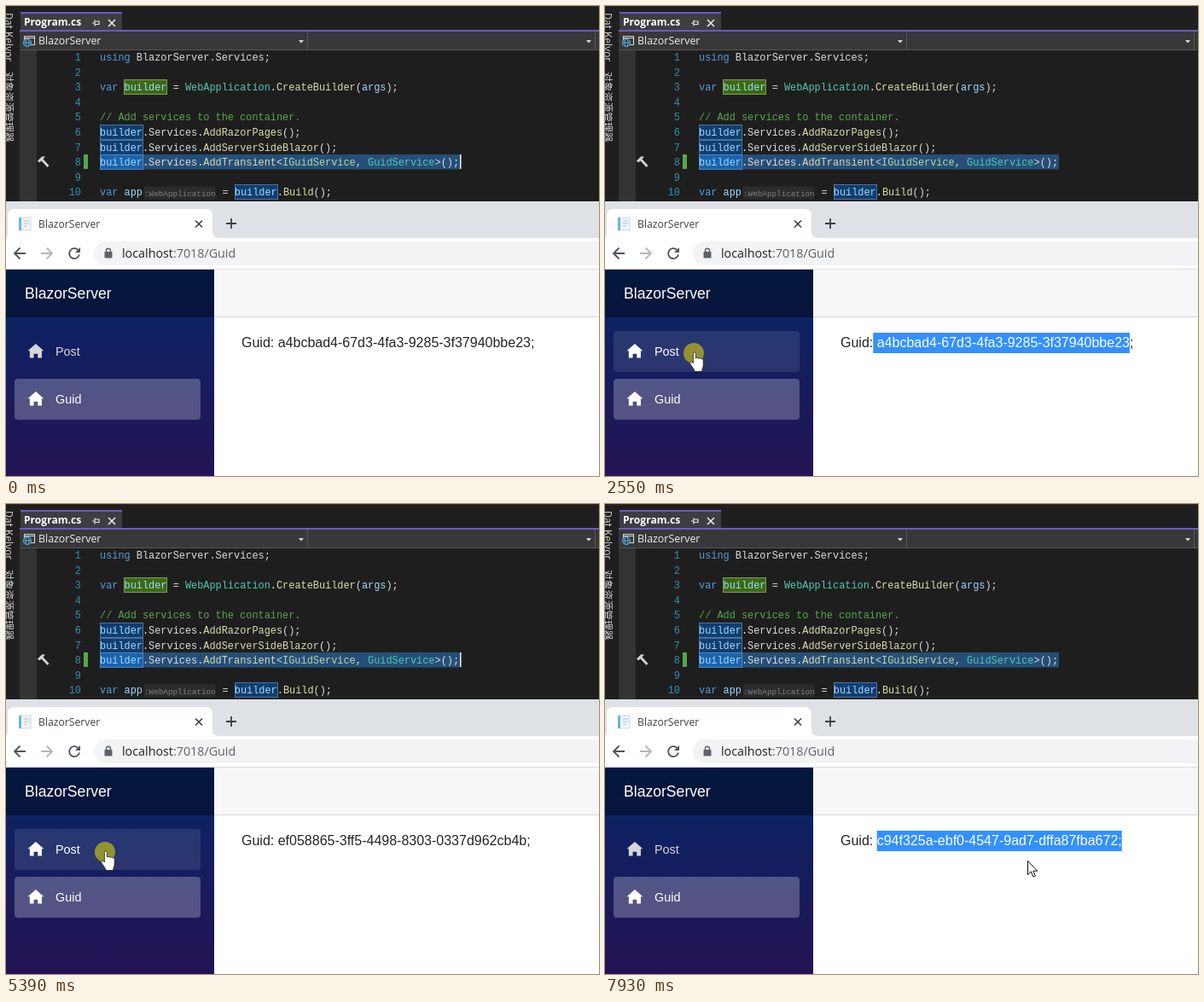
Recreate the animation shown at these times as an HTML page. Size 695 by 551 pixels, loop 8 s.

```html
<!DOCTYPE html>
<html lang="en">
<head>
<meta charset="utf-8">
<title>Transient service demo</title>
<style>
  html, body { margin: 0; width: 100%; height: 100%; overflow: hidden; background: #fff; }
  svg { display: block; }
  text { white-space: pre; }
  .code { font: 11.9px "Liberation Mono", monospace; fill: #dcdcdc; }
  .ui { font-family: "Open Sans", "Noto Sans", sans-serif; }
  .web { font-family: "Liberation Sans", Arial, sans-serif; }
  .side { font: 11.8px "Noto Sans CJK SC", "Noto Sans", sans-serif; fill: #d0d0d0; }
  .num { fill: #2b91af; text-anchor: end; }
  .k { fill: #569cd6; } .v { fill: #9cdcfe; } .t { fill: #4ec9b0; }
  .m { fill: #dcdcaa; } .i { fill: #b8d7a3; } .c { fill: #57a64a; }
  .line { fill: none; stroke-linecap: butt; }
</style>
</head>
<body>
<svg id="stage" width="695" height="551" viewBox="0 0 695 551">
  <defs>
    <linearGradient id="night" gradientUnits="userSpaceOnUse" x1="0" y1="309" x2="0" y2="715">
      <stop offset="0" stop-color="#052767"/><stop offset="1" stop-color="#3a0647"/>
    </linearGradient>
    <path id="home" d="M4 0l-4 3.500h1v3.500h2v-2h2v2h2v-3.500h1z"/>
  </defs>

  <!-- editor -->
  <rect width="695" height="230" fill="#1f1f1f"/>
  <rect width="695" height="1" fill="#35291c"/>
  <rect x="17" y="7" width="119" height="22" fill="#3d3d42"/>
  <rect x="17" y="7" width="119" height="2" fill="#6a5bc4"/>
  <rect x="16" y="28" width="679" height="2" fill="#6a5bc4"/>
  <text x="21" y="23" class="ui" font-size="12.1" font-weight="700" fill="#fff">Program.cs</text>
  <path d="M101 20h3M104 16.500v7M104 18h5v3.500h-5" class="line" stroke="#e8e8e8" stroke-width="1.200"/>
  <path d="M120 16l8 8M128 16l-8 8" class="line" stroke="#f1f1f1" stroke-width="1.500"/>
  <rect x="16" y="30" width="679" height="22" fill="#383838"/>
  <path d="M16 51.500h679M353.500 30v21M690.500 30v21" class="line" stroke="#55555a"/>
  <path d="M343 40h6l-3 3.500zM680 40h6l-3 3.500z" fill="#d6d6d6"/>
  <g class="line" stroke="#58a9dc" stroke-width="1.100">
    <path d="M21.500 35.500h12v10h-12zM21.500 37.500h12" stroke="#d6d6d6"/>
    <circle cx="25" cy="43" r="4.500" fill="#383838"/><ellipse cx="25" cy="43" rx="2" ry="4.500"/><path d="M20.500 43h9"/>
  </g>
  <text x="38" y="45" class="ui" font-size="12.4" fill="#f1f1f1">BlazorServer</text>
  <rect x="16" y="52" width="679" height="178" fill="#1e1e1e"/>
  <rect x="16" y="52" width="20" height="178" fill="#333"/>
  <g transform="rotate(90)"><text x="8" y="1.500" class="side">Dat Kelvor</text><text x="77" y="1.500" class="side">对象资源管理器</text></g>
  <path d="M37 181.500l5-5h4l-2.500 3 7 7.500-2 2-7-7.500-2.500 2z" fill="#d2d2d2"/>
  <rect x="91" y="174" width="5" height="17" fill="#57a64a"/>
  <rect x="110" y="174" width="422" height="17.600" fill="#264f78"/>
  <g id="marks"></g>
  <rect x="161.500" y="211.500" width="84" height="15" rx="2" fill="#2b2b2b"/>
  <g id="code" class="code"></g>
  <rect id="caret" x="532" y="174" width="1.500" height="17" fill="#f0f0f0"/>

  <!-- browser -->
  <rect y="229" width="695" height="322" fill="#fff"/>
  <rect y="229" width="695" height="43" fill="#dee1e6"/>
  <path d="M0 272q2-1 2-6v-20q0-8 8-8h224q8 0 8 8v18q0 8 8 8z" fill="#fff"/>
  <path d="M16 248h13v15h-13z" fill="#eff5f9" stroke="#c3d0da" stroke-width=".8"/>
  <path d="M15 248h3v15h-3z" fill="#6fb3dc"/>
  <path d="M21 252h6M21 255h6M21 258h4" class="line" stroke="#b3c5d2"/>
  <text x="38" y="260" class="ui" font-size="12.2" fill="#3c4043">BlazorServer</text>
  <path d="M222 251.500l8 8M230 251.500l-8 8" class="line" stroke="#3c4043" stroke-width="1.600"/>
  <path d="M258 255h12M264 249v12" class="line" stroke="#3c4043" stroke-width="1.800"/>
  <path d="M23 290h-13M16.500 283.500l-6.500 6.500 6.500 6.500" class="line" stroke="#50545a" stroke-width="1.800"/>
  <path d="M41 290h13M47.500 283.500l6.500 6.500-6.500 6.500" class="line" stroke="#b3b6ba" stroke-width="1.800"/>
  <path d="M84.500 286a6 6 0 1 0 1.500 5.500" class="line" stroke="#50545a" stroke-width="1.800"/>
  <path d="M87 283v6h-6z" fill="#50545a"/>
  <path d="M695 276h-578a14 14 0 0 0 0 28h578z" fill="#f1f3f4"/>
  <rect x="115.500" y="288" width="9" height="7.500" rx="1" fill="#5f6368"/>
  <path d="M117.500 289v-2.200a2.500 2.500 0 0 1 5 0v2.200" class="line" stroke="#5f6368" stroke-width="1.400"/>
  <text x="136" y="295" class="ui" font-size="14.3" fill="#5f6368"><tspan fill="#202124">localhost</tspan>:7018/Guid</text>
  <rect y="308" width="695" height="1" fill="#dcdee1"/>

  <!-- page -->
  <rect y="309" width="244" height="242" fill="url(#night)"/>
  <rect y="309" width="244" height="56" fill="#000" fill-opacity=".4"/>
  <rect x="244" y="309" width="451" height="55" fill="#f7f7f7"/>
  <rect x="244" y="364" width="451" height="1" fill="#d6d5d5"/>
  <text x="22" y="343" class="web" font-size="17.6" fill="#fff">BlazorServer</text>
  <g id="nav" class="web" font-size="14.4"></g>
  <g id="guid" class="web" font-size="16" fill="#212529">
    <rect id="mark" y="383" height="24" fill="#3390ff"/>
    <text id="line" x="276" y="400"><tspan></tspan><tspan fill="#fff"></tspan><tspan></tspan></text>
  </g>

  <!-- pointer -->
  <g id="pointer">
    <circle id="press" cx="-1" cy="0" r="12" fill="#ebde00" fill-opacity=".55"/>
    <path id="arrow" d="M.5 .5v16l3.800-3.500 2.600 6 2.500-1-2.600-5.800h5z" fill="#fff" stroke="#111"/>
    <path id="beam" d="M-3 -8h2l1 1 1-1h2M0-7v14M-3 8h2l1-1 1 1h2" class="line" stroke="#111"/>
    <path id="hand" transform="translate(0 -1)" d="M-1.600 1.400C-1.600-.4 1.400-.4 1.400 1.400V7c.6-1 2.800-1 3.200.4.8-1 2.600-.6 3 .6 1-.8 2.600-.2 2.600 1.400V15c0 3-1.600 4-1.600 7.500H0c0-2.500-3.500-6-5.200-9-.6-2 1.200-3 2.400-1.700L-1.600 13z" fill="#fff" stroke="#111" stroke-width=".7"/>
  </g>
</svg>
<script>
const LOOP = 8000;
const $ = id => document.getElementById(id);

function add(parent, tag, attrs, text) {
  const el = document.createElementNS("http://www.w3.org/2000/svg", tag);
  for (const key in attrs) el.setAttribute(key, attrs[key]);
  if (text) el.textContent = text;
  parent.appendChild(el);
  return el;
}

// Code lines: "class|text" tokens, no class for plain text
const services = (...rest) => ["v|builder", "|.Services.", ...rest];
const lines = [
  ["k|using", "| BlazorServer.Services;"],
  [],
  ["k|var ", "v|builder", "| = ", "t|WebApplication", "|.", "m|CreateBuilder", "|(", "v|args", "|);"],
  [],
  ["c|// Add services to the container."],
  services("m|AddRazorPages", "|();"),
  services("m|AddServerSideBlazor", "|();"),
  services("m|AddTransient", "|<", "i|IGuidService", "|, ", "t|GuidService", "|>();"),
  [],
  ["k|var ", "v|app"]
];
function addTokens(x, y, tokens) {
  const row = add($("code"), "text", { x, y });
  for (const token of tokens) {
    const [cls, text] = token.split("|");
    add(row, "tspan", { class: cls }, text);
  }
  return row;
}
lines.forEach((tokens, i) => {
  const y = 64 + 17.6 * i;
  add($("code"), "text", { x: 88, y, class: "num" }, String(i + 1));
  addTokens(110, y, tokens);
});
addTokens(162, 223, ["|:WebApplication"]).setAttribute("style", "font-size:9.3px;fill:#808080");
addTokens(253.500, 222.4, ["|= ", "v|builder", "|.", "m|Build", "|();"]);

const box = (x, y, fill, stroke) =>
  add($("marks"), "rect", { x: x + .5, y: y + .5, width: 50, height: 17, fill, stroke });
box(138, 86, "#3b6a10", "#7f9a62");
for (const [x, y] of [[110, 139], [110, 157], [268, 209]]) box(x, y, "#113d6f", "#47759f");
box(110, 174, "#1d62ad", "#4d88c2");

// Side menu
const items = [["Post", 381], ["Guid", 437]].map(([name, y]) => {
  const g = add($("nav"), "g", {});
  const back = add(g, "rect", { x: 10, y, width: 218, height: 48, rx: 4, fill: "#fff" });
  add(g, "use", { href: "#home", transform: `translate(25.500 ${y + 15}) scale(2.35)` });
  add(g, "text", { x: 58, y: y + 29 }, name);
  return { name, y, g, back };
});

// Bursts of movement: start, end, number of pictures
const bursts = [
  [70, 690, 10], [910, 1530, 10], [1730, 2420, 10], [2550, 3160, 9], [3350, 4040, 10],
  [4170, 4660, 8], [5390, 6140, 11], [6210, 6980, 12], [7040, 7730, 10], [7860, 7930, 2]
];
// Pointer stops: time, x, y
const stops = [
  [70, 541, 514], [690, 316, 394], [900, 316, 394], [1530, 621, 393], [1660, 621, 393],
  [1860, 616, 394], [2420, 105, 407], [2690, 105, 407], [3160, 100, 465], [3490, 100, 465],
  [4040, 420, 415], [4100, 420, 415], [4660, 117, 408], [5500, 117, 408], [5900, 173, 454],
  [6140, 173, 454], [6980, 325, 397], [7030, 325, 397], [7730, 623, 406], [7790, 623, 406],
  [7930, 495, 418]
];
const presses = [[910, 1860], [2550, 2680], [3350, 3410], [5390, 5530], [5900, 6000], [7040, 7850]];
// Page content and active menu item over time
const pages = [
  [0, "a4bcbad4-67d3-4fa3-9285-3f37940bbe23"], [2680, ""],
  [3410, "ef058865-3ff5-4498-8303-0337d962cb4b"], [5530, ""],
  [6000, "c94f325a-ebf0-4547-9ad7-dffa87fba672"]
];
const actives = [[0, "Guid"], [2680, "Post"], [3550, "Guid"], [5530, "Post"], [6000, "Guid"]];
// Text selections: from, drag end, until, first character
const drags = [[910, 1860, 2680, 5], [7040, 7790, LOOP, 6]];

const latest = (table, t) => table.filter(row => row[0] <= t).pop();
const within = (t, [from, to]) => t >= from && t < to;

function stepped(t) {
  const burst = latest(bursts, t);
  if (!burst) return 0;
  const [from, to, count] = burst;
  const step = (to - from) / (count - 1);
  return from + Math.floor((Math.min(t, to) - from + 1) / step) * step;
}

function pointerAt(t) {
  const next = stops.findIndex(s => s[0] > t);
  if (next === 0) return stops[0].slice(1);
  if (next < 0) return stops[stops.length - 1].slice(1);
  const [t0, x0, y0] = stops[next - 1], [t1, x1, y1] = stops[next];
  const p = (t - t0) / (t1 - t0), e = p * p * (3 - 2 * p);
  return [x0 + (x1 - x0) * e, y0 + (y1 - y0) * e];
}

const line = $("line"), parts = [...line.children];
const widthTo = n => n > 0 ? line.getSubStringLength(0, n) : 0;

function setLine(text, a, b) {
  [text.slice(0, a), text.slice(a, b), text.slice(b)].forEach((s, i) => {
    if (parts[i].textContent !== s) parts[i].textContent = s;
  });
}

function drawGuid(t) {
  const value = latest(pages, t)[1];
  const text = value ? `Guid: ${value};` : "";
  const drag = drags.find(d => within(t, [d[0], d[2]]));
  let end = 0;
  setLine(text, 0, 0);
  if (drag && text) {
    const x = pointerAt(Math.min(t, drag[1]))[0] - 276;
    end = drag[3];
    while (end < text.length && (widthTo(end) + widthTo(end + 1)) / 2 < x) end++;
    const left = widthTo(drag[3]);
    $("mark").setAttribute("x", 276 + left);
    $("mark").setAttribute("width", widthTo(end) - left);
    setLine(text, drag[3], end);
  }
  $("mark").style.display = end ? "" : "none";
  return widthTo(text.length);
}

function draw(now) {
  const t = now % LOOP, q = stepped(t);
  const [x, y] = pointerAt(q);
  const active = latest(actives, q)[1];
  const width = drawGuid(q);

  let shape = "arrow";
  if (y > 383 && y < 407 && x > 276 && x < 276 + width) shape = "beam";
  for (const item of items) {
    const hover = q >= 70 && x > 10 && x < 228 && y >= item.y && y < item.y + 48;
    const on = item.name === active;
    const fading = item.name === "Post" && within(q, [6000, 6200]);
    if (hover) shape = "hand";
    item.back.setAttribute("fill-opacity", hover || fading ? .1 : on ? .25 : 0);
    item.g.setAttribute("fill", hover || on ? "#fff" : "#d7d7d7");
  }

  $("pointer").style.display = q < 70 ? "none" : "";
  $("pointer").setAttribute("transform", `translate(${x.toFixed(1)} ${y.toFixed(1)})`);
  for (const id of ["arrow", "beam", "hand"]) $(id).style.display = id === shape ? "" : "none";
  $("press").style.display = presses.some(p => within(q, p)) ? "" : "none";
  $("caret").style.display = (t + 310) % 1060 < 530 ? "" : "none";
}

const begin = performance.now();
function tick() {
  draw(performance.now() - begin);
  requestAnimationFrame(tick);
}
tick();
</script>
</body>
</html>
```
